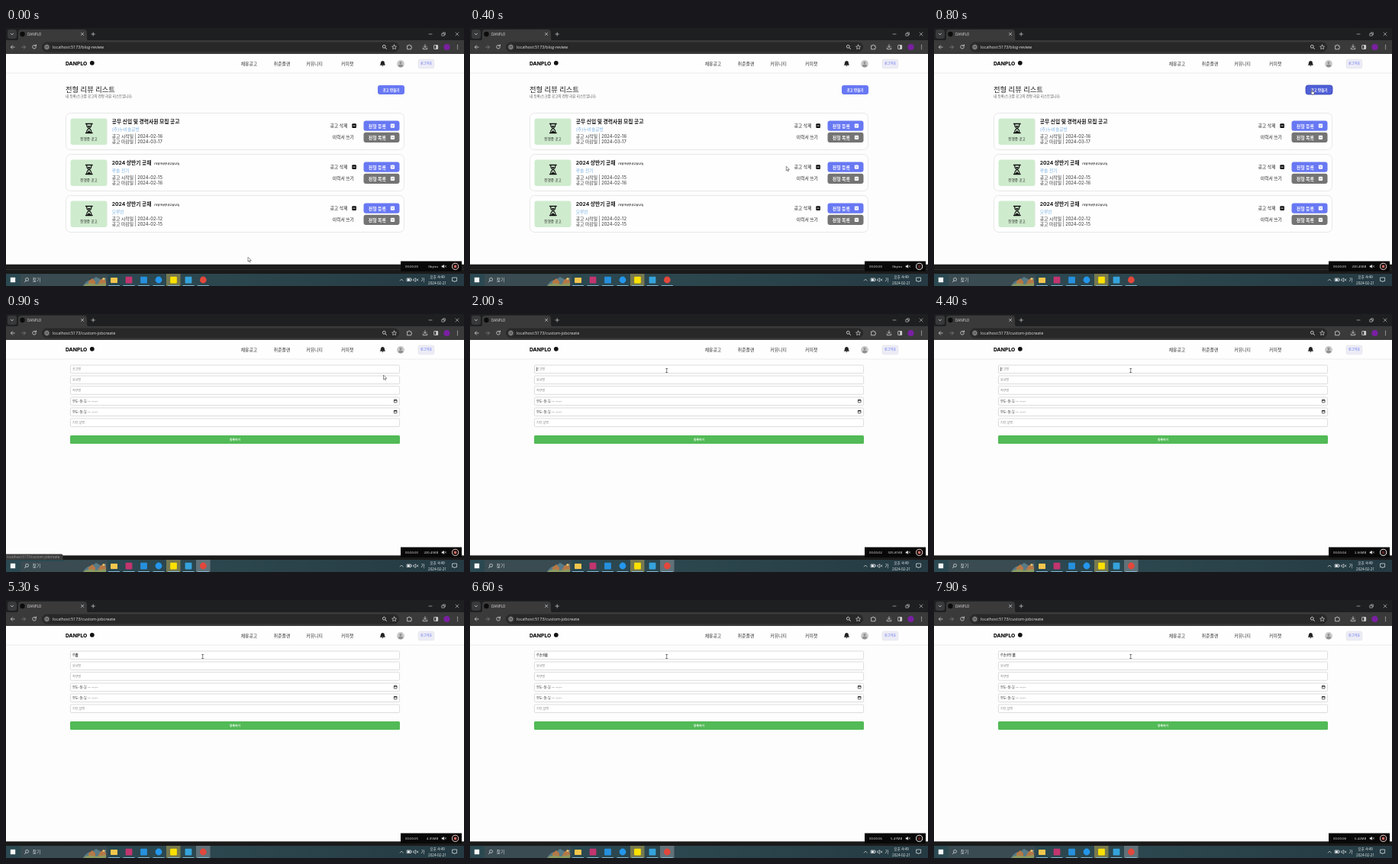
These frames come from a looping animation (600x338 px, 8000 ms). An HTML page:

```html
<!DOCTYPE html>
<html lang="ko">
<head>
<meta charset="utf-8">
<title>DANPLO</title>
<style>
html, body { margin: 0; width: 100%; height: 100%; overflow: hidden; background: #fdfdfd; }
svg { display: block; width: 100vw; height: 100vh; }
text { font-family: Inter, "Noto Sans CJK KR", "Noto Sans CJK", sans-serif; white-space: pre; }
.ui { font-family: "Open Sans", "Noto Sans CJK KR", "Noto Sans CJK", sans-serif; }
</style>
</head>
<body>
<svg id="stage" viewBox="0 0 600 338"></svg>
<script>
const rect = (x, y, w, h, fill, r = 0, more = '') =>
  `<rect x="${x}" y="${y}" width="${w}" height="${h}" rx="${r}" fill="${fill}" ${more}/>`;
const dot = (x, y, r, fill, more = '') => `<circle cx="${x}" cy="${y}" r="${r}" fill="${fill}" ${more}/>`;
const line = (d, color, w = .8, fill = 'none') =>
  `<path d="${d}" stroke="${color}" stroke-width="${w}" fill="${fill}" stroke-linecap="round" stroke-linejoin="round"/>`;
const shape = (d, fill) => `<path d="${d}" fill="${fill}"/>`;
const text = (x, y, size, s, fill = '#222', more = '') =>
  `<text x="${x}" y="${y}" font-size="${size}" fill="${fill}" ${more}>${s}</text>`;
const ui = (x, y, size, s, fill, more = '') => text(x, y, size, s, fill, `class="ui" ${more}`);
const group = (id, s) => `<g id="${id}">${s}</g>`;
const BOLD = 'font-weight="700"', END = 'text-anchor="end"', MID = 'text-anchor="middle"';

function browser() {
  const ink = '#d5d5d5';
  return rect(0, 0, 600, 17, '#1e1f20') + rect(0, 16, 600, 18, '#3a3a3b') +
    rect(2, 2, 12, 12, '#38393a', 3) + line('M6.3 7.2l1.7 1.7 1.7-1.7', ink) +
    shape('M12 17Q16 17 16 13V6Q16 2 20 2H102Q106 2 106 6V13Q106 17 110 17Z', '#3a3a3b') +
    dot(21.5, 8, 3.2, '#0b0b0b') + ui(28, 10, 4.6, 'DANPLO', '#e2e2e2') +
    line('M98.5 6.3l3.2 3.2m0-3.2l-3.2 3.2M112 8h4.4m-2.2-2.2v4.4', ink, .7) +
    line('M554 8h4M589 6l4 4m0-4l-4 4M571.2 7.2h3v3h-3zM572.4 7v-1.1h3v3h-1', ink, .6) +
    rect(47, 18.5, 468, 13, '#282828', 6.5) +
    line('M11.2 25H6.5m2-2.2L6.3 25l2.2 2.2', ink) +
    line('M20.7 25h4.7m-2-2.2l2.2 2.2-2.2 2.2', '#808080') +
    line('M39 23.3a2.4 2.4 0 1 0 .4 2.1M39.5 21.8v2h-2', ink) +
    dot(53.5, 25, 4.4, '#3c3c3c') + dot(53.5, 25, 2.4, 'none', `stroke="${ink}" stroke-width=".7"`) +
    line('M53.5 25v1.1M53.5 23.8v.1', ink, .7) +
    dot(495.3, 24.3, 1.9, 'none', `stroke="${ink}" stroke-width=".9"`) + line('M496.8 25.8l1.7 1.7', ink, 1) +
    line('M508.6 22l.9 2 2.1.2-1.6 1.4.5 2.1-1.9-1.1-1.9 1.1.5-2.1-1.6-1.4 2.1-.2z', ink, .7) +
    line('M526 23h1.6q.6-2.4 1.6 0h1.6v1.6q2.4.7 0 1.6v1.6H526z', ink, .8) +
    line('M549 21.8v3.6m-1.7-1.5l1.7 1.7 1.7-1.7M546.3 26v1.7h5.4V26', ink, .8) +
    rect(560.7, 22.5, 5, 5, 'none', .5, `stroke="${ink}" stroke-width=".8"`) + rect(563.3, 22.5, 2.4, 5, ink) +
    dot(577.5, 25, 4, '#7b1fa2') +
    [22.7, 25, 27.3].map(y => dot(591.5, y, .65, ink)).join('') +
    ui(61, 27, 5.4, '', '#e6e6e6', 'id="url"');
}

function header() {
  const nav = [[307.7, '채용공고'], [350.8, '취준플랜'], [393.3, '커뮤니티'], [439, '커피챗']];
  return rect(0, 34, 600, 25, '#fefefe') + rect(0, 58.7, 600, .6, '#dedede') +
    text(78, 48.6, 6.8, 'DANPLO', '#111', 'font-weight="800"') + dot(112.8, 45.8, 2.9, '#111') +
    nav.map(([x, s]) => text(x, 48.7, 5.85, s, '#333')).join('') +
    shape('M489.7 48.7q1.2-1 1.2-3.2 0-2.3 2.5-2.6 2.5.3 2.5 2.6 0 2.2 1.2 3.2zM492.3 49.3h2.2q-1.1 1.8-2.2 0z', '#222') +
    dot(517, 47, 4.9, '#c9c9c9') + dot(517, 45.5, 1.6, '#8f8f8f') +
    shape('M513.8 50q.3-2.5 3.2-2.5t3.2 2.5q-3.2 2.4-6.4 0z', '#8f8f8f') +
    rect(540, 41, 21, 12, '#ececf5', 2.5, 'stroke="#dcdce6" stroke-width=".4"') +
    text(550.5, 48.4, 4.1, '로그아웃', '#5a67f0', MID);
}

function action(y, fill, label) {
  return rect(468.5, y, 47, 13.3, fill, 3) + text(474.8, y + 9, 5.9, label, '#fff', BOLD) +
    rect(503.8, y + 4, 5.3, 5.3, '#fff', 1) + line(`M505.3 ${y + 6}l1.2 1.2 1.2-1.2`, fill, .8);
}

function card(y, title, firm, start, end, own) {
  return rect(78.5, y, 443, 48, '#fefefe', 6, 'stroke="#e2e2e2" stroke-width=".8"') +
    rect(84.5, y + 7, 48, 34.5, '#cfebce', 3) +
    line(`M104.5 ${y + 14}h8.6M104.5 ${y + 26}h8.6`, '#111', 1.4) +
    line(`M105.8 ${y + 14}v2.2q0 1.5 2.6 3.8-2.6 2.3-2.6 3.8v2.2M111.8 ${y + 14}v2.2q0 1.5-2.6 3.8 2.6 2.3 2.6 3.8v2.2`, '#111', 1.2) +
    shape(`M106.7 ${y + 16.5}h4.2l-2.1 2.6zM106 ${y + 25.8}l2.8-3.2 2.8 3.2z`, '#111') +
    text(108.5, y + 41.5 - 6.2, 4.6, '진행중 공고', '#222', MID + ' font-weight="500"') +
    text(138.7, y + 13.6, 6.75, title, '#151515', BOLD) +
    (own ? text(194, y + 13.2, 3.2, '(직접 작성한 공고입니다)', '#222', BOLD + ' font-style="italic"') : '') +
    text(138.7, y + 23, 5.8, firm, '#7fb4e6') +
    text(138.7, y + 32.2, 5.8, `공고 시작일 | ${start}`, '#333') +
    text(138.7, y + 39.6, 5.8, `공고 마감일 | ${end}`, '#333') +
    text(424.4, y + 18.8, 5.9, '공고 삭제', '#222', 'font-weight="500"') +
    rect(453.3, y + 13.8, 5.6, 5.6, '#111', 1) + line(`M454.9 ${y + 16.6}h2.4`, '#fff') +
    text(427.8, y + 33.8, 5.75, '이력서 쓰기', '#222', 'font-weight="500"') +
    action(y + 10, '#6878f3', '전형 등록') + action(y + 25.3, '#747474', '전형 목록');
}

function list() {
  return text(78, 84, 9.3, '전형 리뷰 리스트', '#1c1c1c', 'font-weight="500"') +
    text(78, 91.2, 4.5, '내 등록/스크랩 공고의 전형 리뷰 리스트입니다.', '#555') +
    rect(487, 75, 35, 12, '#6878f3', 3, 'id="create"') +
    text(504.5, 82.7, 4.6, '공고 만들기', '#fff', MID + ' ' + BOLD) +
    card(111.5, '공무 신입 및 경력사원 모집 공고', '(주)누비솔공방', '2024-02-16', '2024-03-17') +
    card(165.5, '2024 상반기 공채', '루솔 전기', '2024-02-15', '2024-02-16', true) +
    card(219.5, '2024 상반기 공채', '모루빈', '2024-02-12', '2024-02-15', true) +
    rect(0, 309.7, 600, 7, '#1c1c1c');
}

function form() {
  const date = '연도-월-일 -- --:--';
  const rows = ['공고명', '회사명', '직무명', date, date, '기타 설명'];
  return rows.map((s, i) => {
    const y = 67 + 14 * i - (i === 2 ? .3 : 0), isDate = s === date;
    return rect(84.4, y, 431.2, 10.6, '#fff', 1.5, 'stroke="#cfcfcf" stroke-width=".7"') +
      (i ? text(87, y + 6.8, isDate ? 4.1 : 4, s, isDate ? '#333' : '#808080') : '') +
      (isDate ? rect(508.4, y + 3.6, 3.6, 3.4, 'none', .3, 'stroke="#222" stroke-width=".7"') +
        rect(508.2, y + 3.2, 4, 1.3, '#222') : '');
  }).join('') +
    rect(84, 159, 432, 11, '#52ba57', 1.5) + text(300, 166, 3.8, '등록하기', '#fff', MID + ' ' + BOLD) +
    rect(0, 0, 0, 5.6, '#b9b9b9', 0, 'id="compose"') + text(87, 73.8, 4, '', '#222', 'id="typed"') +
    rect(87, 69.6, .5, 5.4, '#111', 0, 'id="caret"');
}

function taskbar() {
  const ink = '#e8eef0';
  const apps = [[161, '#c2356f'], [180.5, '#2690dd'], [200, '#2496ed'], [219.5, '#fae100'], [239, '#35a3dc'], [258.3, '#e2473b']];
  return rect(0, 316.3, 600, 6, '#1a1a1a') +
    rect(0, 322, 600, 16, 'url(#bar)') + rect(5.8, 326.8, 6.4, 6.4, '#f4f7f8') +
    rect(19, 322.6, 114, 15.4, '#3a4b51') +
    dot(27.5, 329.4, 2, 'none', `stroke="${ink}" stroke-width=".7"`) + line('M26 331l-1.7 1.8', ink, .7) +
    text(34.5, 332.3, 6, '찾기', '#d3dadd') +
    shape('M101 338q4-8 11-8l6-4 7 4 6-3v11z', '#587b87') +
    shape('M108 338v-6l5-4 4 4v6zM120 338q3-11 8-10l3 4v6z', '#b67845') +
    shape('M101 338q7-6 17-2l13-2v4z', '#8a9a62') + dot(128, 328.5, 1.6, '#dfc36c') +
    rect(210, 322, 18.5, 16, '#77794f') + rect(249, 322, 18.5, 16, '#617178', 0, 'id="active"') +
    rect(137, 327, 9, 7, '#f3c64d', .8) +
    apps.map(([x, c]) => x === 258.3 || x === 200 ? dot(x, 330, 4.4, c) : rect(x - 4.4, 325.7, 8.8, 8.8, c, 1)).join('') +
    [141.5, ...apps.map(a => a[0])].map(x => rect(x - 7.5, 337, 15, 1, '#83b9d4')).join('') +
    line('M516.3 331l1.9-1.9 1.9 1.9M525.5 328h5v3.6h-5zM531 329v1.5', ink, .7) +
    rect(526, 328.5, 3, 2.6, ink) +
    line('M534 329h1l1.7-1.4v4.8l-1.7-1.4h-1zM538 328.8l2 2.2m0-2.2l-2 2.2', ink, .6) +
    text(543.5, 332.2, 5.4, '가', ink) +
    ui(565, 328.4, 4.8, '오후 4:49', ink, MID) + ui(565, 336, 4.6, '2024-02-21', ink, MID) +
    line('M585 327h5.6v4.5h-2l-1 1.5-.8-1.5H585z', ink, .7);
}

function recorder() {
  return rect(517, 305.5, 80, 13.3, '#080808') +
    ui(523, 314, 4.3, '', '#eee', 'id="clock"') + ui(566.3, 314, 4.3, '', '#eee', END + ' id="size"') +
    shape('M570.7 311.4h1.3l1.8-1.6v5l-1.8-1.6h-1.3z', '#eee') +
    line('M574.8 311.3l1.7 2m0-2l-1.7 2', '#eee', .5) +
    dot(588.6, 312.3, 4.1, '#151010', 'id="ring" stroke-width="1"') +
    rect(587, 310.7, 3.2, 3.2, '#d8685f', .4, 'id="mark"');
}

const cursors =
  group('arrow', line('M0 0v5.4l1.3-1.1.9 2 .9-.4-.9-2h1.7z', '#222', .5, '#fff')) +
  group('hand', line('M0 0q.8-.5 1 .3v2.2l2.3.6q.7.2.5 1.2l-.5 2H.7L-1.2 4q0-.9 1.2-.2z', '#222', .5, '#fff')) +
  group('beam', line('M-1 -2.5h2M0 -2.5v5M-1 2.5h2', '#333', .6));

stage.innerHTML = `<defs><linearGradient id="bar"><stop stop-color="#2b4951"/>
  <stop offset=".5" stop-color="#2c464e"/><stop offset="1" stop-color="#253a42"/></linearGradient></defs>` +
  rect(0, 0, 600, 338, '#fdfdfd') + browser() + header() + group('list', list()) + group('form', form()) +
  taskbar() +
  group('status', rect(-3, 314.5, 77.5, 9, '#3b3b3b', 2) + rect(0, 322, 76, 2, '#2b4951') +
    ui(1, 319.8, 4.55, 'localhost:5173/custom-jobcreate', '#9b9b9b')) +
  recorder() + cursors;

const el = id => document.getElementById(id);
const show = (id, on) => el(id).setAttribute('visibility', on ? 'visible' : 'hidden');
const set = (id, props) => Object.entries(props).forEach(([k, v]) => el(id).setAttribute(k, v));
const put = (id, s) => { if (el(id).textContent !== s) el(id).textContent = s; };

// Linear interpolation over [time, value] keys.
function track(keys, t) {
  const i = keys.findIndex(k => k[0] > t);
  if (i < 0) return keys[keys.length - 1][1];
  if (!i) return keys[0][1];
  const [[a, u], [b, v]] = [keys[i - 1], keys[i]];
  return u + (v - u) * (t - a) / (b - a);
}

const pathX = [[0, 317], [150, 320], [600, 489], [750, 494.5], [1000, 494.5], [1300, 400], [1700, 257.7]];
const pathY = [[0, 300.7], [150, 292], [600, 94], [750, 81], [1000, 80], [1300, 76], [1700, 74]];
const bytes = [[0, 0], [500, 200.45], [1000, 200.45], [2000, 505.81], [3500, 1.97 * 1024], [5000, 4.05 * 1024], [7500, 6.42 * 1024]];
const typing = [[0, ''], [4600, 'ㄹ'], [4750, '루'], [4950, '루ㅅ'], [5100, '루소'], [5250, '루솔'],
  [5800, '루솔ㅅ'], [6050, '루솔새'], [6300, '루솔생'], [6550, '루솔생ㅁ'], [6750, '루솔생며'], [6950, '루솔생명'],
  [7200, '루솔생명 '], [7400, '루솔생명 ㄱ'], [7600, '루솔생명 고'], [7750, '루솔생명 공']];

function draw(t) {
  const onForm = t >= 900, hover = t >= 650 && !onForm, beam = t >= 1600;
  show('list', !onForm);
  show('form', onForm);
  show('active', onForm);
  show('status', onForm && t < 1500);
  put('url', 'localhost:5173/' + (onForm ? 'custom-jobcreate' : 'blog-review'));
  set('create', { fill: hover ? '#5060d8' : '#6878f3', stroke: hover ? '#3545b0' : 'none', 'stroke-width': .8 });

  const at = `translate(${track(pathX, t)} ${track(pathY, t)})`;
  ['arrow', 'hand', 'beam'].forEach(id => set(id, { transform: at }));
  show('arrow', !hover && !beam);
  show('hand', hover);
  show('beam', beam);

  const typed = typing.filter(k => k[0] <= t).pop()[1];
  put('typed', typed || '공고명');
  set('typed', { fill: typed ? '#222' : '#808080' });
  const composing = onForm && typed && !typed.endsWith(' ');
  show('compose', composing);
  if (composing) {
    const box = el('typed').getExtentOfChar(typed.length - 1);
    set('compose', { x: box.x, y: 69.4, width: box.width });
  }
  const end = typed ? 87 + el('typed').getComputedTextLength() : 87;
  set('caret', { x: end });
  show('caret', onForm && t >= 1800 && !composing && (t - 1800) % 1060 < 530);

  put('clock', '00:00:0' + Math.floor(t * 1.02 / 1000));
  const kb = track(bytes, Math.floor(t / 500) * 500);
  put('size', !kb ? '0bytes' : kb < 1024 ? kb.toFixed(2) + 'KB' : (kb / 1024).toFixed(2) + 'MB');
  const lit = t % 1000 < 400 || t % 1000 >= 700;
  set('ring', { stroke: lit ? '#f0cfcb' : '#f4f4f4' });
  set('mark', { fill: lit ? '#d8685f' : '#5a2020' });
}

function tick(now) {
  draw(now % 8000);
  requestAnimationFrame(tick);
}
draw(0);
requestAnimationFrame(tick);
</script>
</body>
</html>
```
